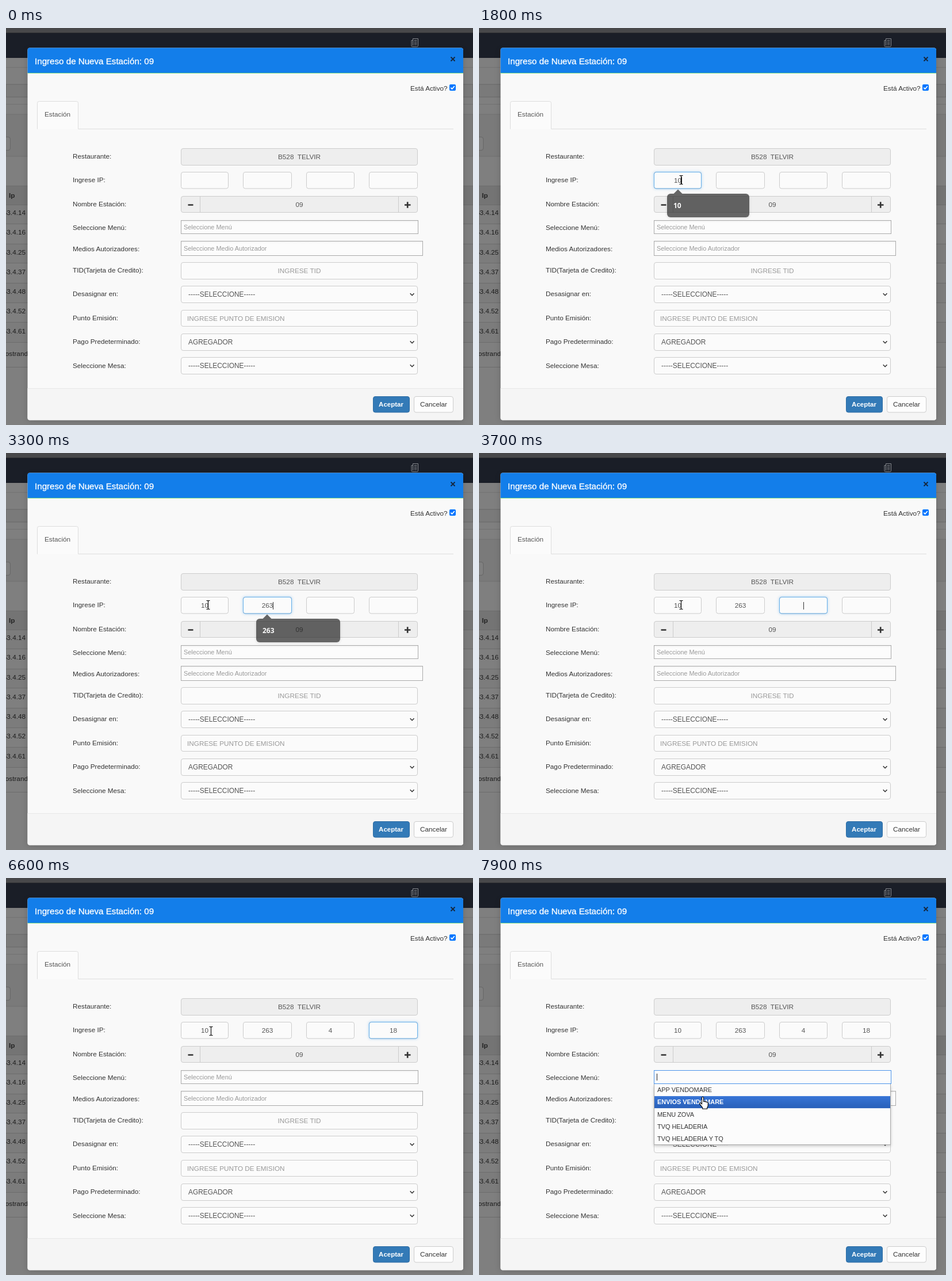
Animation, 812 px wide and 690 px high, one loop 8000 ms. Source, as an HTML page:

```html
<!DOCTYPE html>
<html lang="es">
<head>
<meta charset="utf-8">
<style>
html, body { margin: 0; width: 100%; height: 100%; overflow: hidden; background: #7f7f7f; }
svg { display: block; width: 812px; height: 690px; }
text { font: 11.75px "Liberation Sans", Arial, sans-serif; fill: #333; white-space: pre; }
.field { fill: #555; }
.hint { fill: #999; }
.small { font-size: 10.93px; }
.mid { text-anchor: middle; }
.end { text-anchor: end; }
.bold { font-weight: 700; }
.tip { font: 700 12px "Open Sans", sans-serif; fill: #fff; }
.head { font-size: 15.15px; fill: #fff; stroke: #fff; stroke-width: .3px; }
</style>
</head>
<body>
<svg viewBox="0 0 812 690">
  <defs>
    <linearGradient id="hot" x2="0" y2="1"><stop stop-color="#3875d7"/><stop offset=".9" stop-color="#2a62bc"/></linearGradient>
    <linearGradient id="inset" x2="0" y2="1"><stop stop-color="#eee"/><stop offset=".15" stop-color="#fcfcfc"/></linearGradient>
    <filter id="blur" x="-20%" y="-50%" width="140%" height="200%"><feGaussianBlur stdDeviation="2.5"/></filter>
    <filter id="soft"><feGaussianBlur stdDeviation="6"/></filter>
  </defs>
  <g id="still"></g>
  <g id="live"></g>
</svg>
<script>
const LOOP = 8000, STEP = 100;
const still = document.getElementById('still'), live = document.getElementById('live');

const rect = (x, y, w, h, fill, more = '') =>
  `<rect x="${x}" y="${y}" width="${w}" height="${h}" fill="${fill}" ${more}/>`;
const box = (x, y, w, h, fill = '#fbfbfb', stroke = '#ccc', r = 3.5) =>
  rect(x + .5, y + .5, w - 1, h - 1, fill, `stroke="${stroke}" rx="${r}"`);
const text = (x, y, s, cls = '', more = '') => `<text x="${x}" y="${y}" class="${cls}" ${more}>${s}</text>`;
const path = (d, stroke, width = 1, fill = 'none', more = '') =>
  `<path d="${d}" stroke="${stroke}" stroke-width="${width}" fill="${fill}" ${more}/>`;

function page() {
  let s = rect(0, 0, 812, 690, '#7f7f7f') + rect(0, 0, 812, 8, '#48484a') + rect(0, 8, 812, 1, '#2b2c30')
    + rect(0, 9, 812, 43, '#1a1e27');
  s += path('M707.5 18.5h9v12q0 2-2 2h-8q-1.5 0-1.5-2v-9h2.5zM707.5 21.5v9M709.5 21.5h5M709.5 24h5M709.5 26.5h5M709.5 29h5', '#85888d');
  s += rect(0, 68, 812, 1, '#727272') + rect(0, 98, 812, 22, '#7a7a7a', 'stroke="#686868"') + rect(0, 132, 812, 1, '#727272');
  s += rect(0, 150, 812, 73, '#7a7a7a', 'stroke="#707070"') + box(-10, 189, 18, 24, '#7f7f7f', '#666');
  s += rect(0, 274, 812, 33, '#747474');
  const lines = [274, 307, 340, 375, 408, 443, 477, 511, 546, 589];
  lines.forEach((y, i) => {
    if (i % 2 && i < 8) s += rect(0, y, 812, lines[i + 1] - y, '#7c7c7c');
    s += rect(0, y, 812, 1, '#6c6c6c');
  });
  s += text(5, 295, 'Ip', 'bold', 'style="fill:#222"');
  [14, 16, 25, 37, 48, 52, 61].forEach((n, i) =>
    s += text(34, Math.round(325 + i * 34.25), '63.4.' + n, 'end', 'style="fill:#1c1c1c"'));
  return s + text(44.5, 570, 'Mostrando', 'end', 'style="fill:#1c1c1c"');
}

function modal() {
  let s = rect(37, 38, 758, 645, '#000', 'rx="5" opacity=".15" filter="url(#soft)"');
  s += rect(37.5, 34.5, 757.5, 647, '#f9f9f9', 'rx="4"') + path('M37.500 78V38.500q0-4 4-4H791q4 0 4 4V78z', 'none', 0, '#137eea')
    + rect(37.5, 78, 757.5, 1, '#82dd84');
  s += text(50, 63, 'Ingreso de Nueva Estación: 09', 'head') + path('M773.5 50.5l7 7m0-7l-7 7', '#16283e', 1.8);
  s += text(703, 109, 'Está Activo?') + rect(771, 98, 11, 11, '#0075ff', 'rx="2"') + path('M773.3 103.6l2.3 2.4 4.2-5', '#fff', 1.7);
  s += path('M54 175.5h.5V130.5q0-3 3-3H122.500q3 0 3 3V175.5H778', '#ddd', 1, '#fbfbfb') + text(67, 154, 'Estación', '', 'style="fill:#555"');

  const labels = [['Restaurante', 227], ['Ingrese IP', 268], ['Nombre Estación', 310], ['Seleccione Menú', 351],
    ['Medios Autorizadores', 388], ['TID(Tarjeta de Credito)', 425], ['Desasignar en', 466], ['Punto Emisión', 508],
    ['Pago Predeterminado', 549], ['Seleccione Mesa', 591]];
  labels.forEach(([name, y]) => s += text(116, y, name + ':'));

  s += box(304, 209, 412, 30, '#eee') + text(510, 228, 'B528  TELVIR', 'field mid');
  s += box(304, 292, 412, 29, '#eee') + path('M337.5 293V320M682.5 293V320', '#ccc') + text(510, 311, '09', 'field mid');
  s += path('M316.500 307.500h9M693 307.500h10.500M698.200 302.300v10.500', '#333', 2.6);
  s += box(304, 334, 413, 24, 'url(#inset)', '#aaa', 0);
  s += box(304, 370, 421, 26, 'url(#inset)', '#aaa', 0) + text(309, 387, 'Seleccione Medio Autorizador', 'hint small');
  s += box(304, 407, 412, 30) + text(510, 426, 'INGRESE TID', 'hint mid');
  s += box(304, 490, 412, 29) + text(315, 508.5, 'INGRESE PUNTO DE EMISION', 'hint');
  [[448, '-----SELECCIONE-----'], [531, 'AGREGADOR'], [572, '-----SELECCIONE-----']].forEach(([y, v]) =>
    s += box(304, y, 412, 30) + text(317, y + 19, v, 'field', 'style="font-size:11.9px"')
      + path(`M702.700 ${y + 13.3}l3.400 3.400 3.400-3.400`, '#333', 1.6));

  s += path('M37.500 626.5H795V677.500q0 4-4 4H41.500q-4 0-4-4z', 'none', 0, '#f5f5f5') + rect(37.5, 626, 757.5, 1, '#e8e8e8');
  s += box(638, 640, 64, 28.5, '#337ab7', '#2e6da4') + text(669.5, 657.5, 'Aceptar', 'bold mid', 'style="fill:#fff;font-size:11.5px"');
  return s + box(709, 640, 69, 28.5, '#fdfdfd') + text(743.5, 657.5, 'Cancelar', 'mid');
}

// Address fields: position, width, value, focus and blur times, time of each key
const fields = [
  { x: 304, w: 83, value: '10', from: 800, to: 2000, keys: [1600, 1800] },
  { x: 412, w: 85, value: '263', from: 2000, to: 3600, keys: [2700, 3100, 3300] },
  { x: 522, w: 84, value: '4', from: 3600, to: 4700, keys: [4300] },
  { x: 631, w: 85, value: '18', from: 4700, to: 7600, keys: [5400, 5700] }
];
const tips = [
  { x: 327, w: 143, tip: 346, value: '10', from: 900, fade: 1800 },
  { x: 435, w: 146, tip: 454, value: '263', from: 2700, fade: 3300 }
];
const options = ['APP VENDOMARE', 'ENVIOS VENDOMARE', 'MENU ZOVA', 'TVQ HELADERIA', 'TVQ HELADERIA Y TQ'];
const OPEN = 7600;

const clamp = v => Math.max(0, Math.min(1, v));

function field(f, t) {
  const glow = t < f.from ? 0
    : t < f.to ? clamp((t - f.from + 60) / 160) : clamp(1 - (t - f.to + 60) / 160);
  const cx = f.x + f.w / 2, count = f.keys.filter(k => k <= t).length;
  let s = '';
  if (glow) s += rect(f.x, 250, f.w, 29.5, '#66afe9', `rx="4" opacity="${glow * .55}" filter="url(#blur)"`);
  s += box(f.x, 250, f.w, 29.5);
  if (glow) s += box(f.x, 250, f.w, 29.5, 'none', `rgba(102,175,233,${glow})`);
  s += text(cx, 269, f.value.slice(0, count), 'field mid');
  const last = Math.max(f.from, ...f.keys.filter(k => k <= t));
  if (t >= f.from && t < f.to && (t - last) % 1000 < 500)
    s += rect(Math.floor(cx + count * 3.27), 259, 1, 13, '#333');
  return s;
}

function tooltip(b, t) {
  const alpha = t < b.from ? 0 : t < b.fade ? 1 : .68 - .33 * (t - b.fade) / 100;
  if (alpha <= 0) return '';
  return `<g opacity="${alpha}">` + rect(b.x, 290, b.w, 40, '#000', 'rx="6" opacity=".2" filter="url(#blur)"')
    + path(`M${b.tip - 8} 288.500l8-8 8 8z`, 'none', 0, '#202020') + rect(b.x, 288, b.w, 41, '#202020', 'rx="6"')
    + text(b.x + 11, 313, b.value, 'tip') + '</g>';
}

function menu(t, y) {
  if (t < OPEN) return text(309, 349.5, 'Seleccione Menú', 'hint small');
  let s = rect(304, 362, 412, 104, '#000', 'opacity=".2" filter="url(#blur)"')
    + box(304, 357, 412, 107, '#fcfcfc', '#aaa', 0) + box(304, 334, 413, 24, '#fcfcfc', '#4a93ea', 0)
    + rect(309, 340, 1, 12, '#222');
  const hot = Math.floor((y - 358) / 21.1);
  options.forEach((o, i) => {
    const on = i === hot, top = 358 + i * 21.1;
    if (on) s += rect(305, top, 410, 21, 'url(#hot)');
    s += text(310, top + 14.3, o, 'small' + (on ? ' bold' : ''), on ? 'style="fill:#fff"' : '');
  });
  return s;
}

const track = [[100, 771, 59], [700, 351, 264], [6500, 351, 264], [6600, 356, 266], [6900, 382, 472],
  [7100, 377, 400], [7200, 377, 400], [7500, 372, 348], [7600, 372, 348], [7900, 389, 380]];

function pointerAt(t) {
  const i = track.findIndex(k => k[0] >= t);
  if (i <= 0) return track[0].slice(1);
  const [t0, x0, y0] = track[i - 1], [t1, x1, y1] = track[i];
  const p = (t - t0) / (t1 - t0), e = p * p * (3 - 2 * p);
  return [x0 + (x1 - x0) * e, y0 + (y1 - y0) * e];
}

const inputs = [[250, 280], [333, 358], [370, 396], [407, 437]];

function cursor(t, x, y) {
  if (t < track[0][0]) return '';
  let shape;
  if (t >= OPEN && y > 358)
    shape = path('M-1.500 1.500q1.500-2.500 3 0v7q1.500-1 3 .5 1.500-.800 2.500.700 2-.500 2.200 1.500v4q0 2-1.500 4v2h-8v-2l-5-6.500q-.500-2.500 2-1.700l1.800 1.700z', '#000', 1.1, '#fff');
  else if (x > 304 && x < 387 && inputs.some(([a, b]) => y > a && y < b))
    shape = path('M-2.500-7.500h2l1 1 1-1h2M-2.500 7.500h2l1-1 1 1h2M.500-6.500v13', '#000', 1.1);
  else shape = path('M.500.500v15.500l3.600-3.400 2.400 5.600 2.300-1-2.400-5.400h4.800z', '#000', 1, '#fff');
  return `<g transform="translate(${Math.round(x)} ${Math.round(y)})">${shape}</g>`;
}

function draw(t) {
  const [x, y] = pointerAt(t);
  live.innerHTML = fields.map(f => field(f, t)).join('') + menu(t, y)
    + tips.map(b => tooltip(b, t)).join('') + cursor(t, x, y);
}

still.innerHTML = page() + modal();
const start = performance.now();
let shown = -1;
function tick() {
  const t = Math.floor((performance.now() - start) % LOOP / STEP) * STEP;
  if (t !== shown) draw(shown = t);
  requestAnimationFrame(tick);
}
tick();
</script>
</body>
</html>
```
